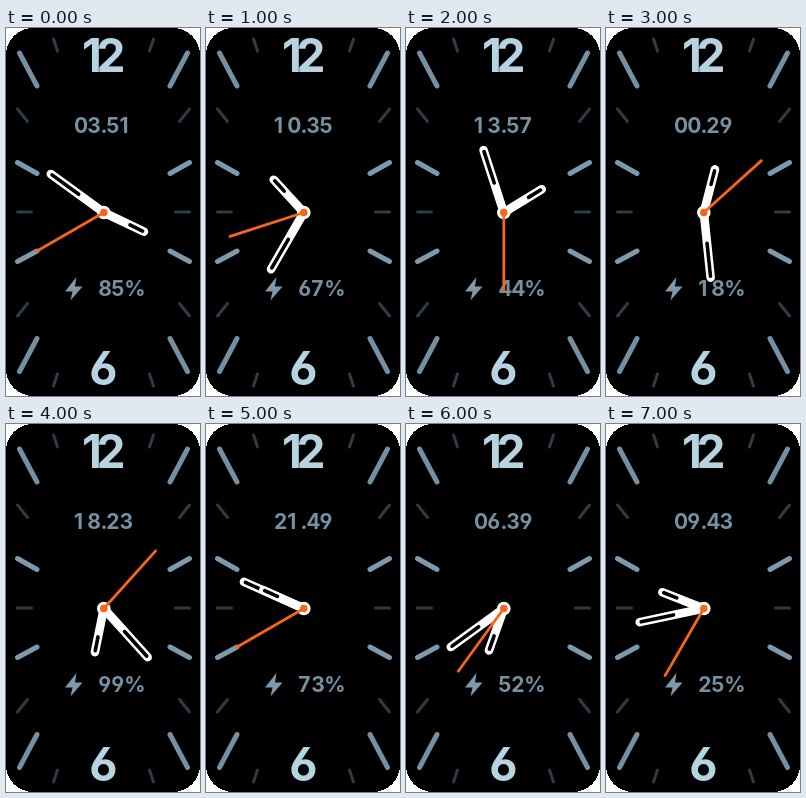
An HTML page for the animation above (8 s loop, 194 px wide and 368 px high).

```html
<!DOCTYPE html>
<html lang="en">
<head>
<meta charset="utf-8">
<title>Watch face</title>
<style>
  html, body { margin: 0; width: 100%; height: 100%; overflow: hidden; background: #fff; }
  svg { display: block; width: 194px; height: 368px; }
  text { font-family: Inter, "Open Sans", sans-serif; font-feature-settings: "cv03", "cv04"; }
  .big { font-size: 46px; font-weight: 650; fill: #b5d3e0; }
  .info { font-size: 21px; font-weight: 650; fill: #7391a3; }
  .tick { fill: none; stroke-linecap: round; }
  .long { stroke: #7391a3; stroke-width: 5; }
  .mid { stroke: #7c9aab; stroke-width: 5; }
  .dim { stroke: #2b3d47; stroke-width: 3; }
  .hand { fill: none; stroke-linecap: round; }
  .body { stroke: #fff; stroke-width: 8.6; }
  .slot { stroke: #000; stroke-width: 3.6; }
  .second { stroke: #f8651a; stroke-width: 2.8; }
</style>
</head>
<body>
<svg viewBox="0 0 194 368">
  <defs>
    <g id="side" class="tick">
      <path class="long" d="M13.500 25L31 58M31 310.500L13.500 343.500"/>
      <path class="mid" d="M11.500 134.500L31 145.500M11.500 233.500L31 223"/>
      <path class="dim" d="M11.500 81L21.500 93.500M11.500 184H25.500M11.500 288L21.500 275.500M47.500 11L51.500 23M51.500 346L47.500 358"/>
    </g>
  </defs>
  <rect width="194" height="368" rx="27" shape-rendering="crispEdges"/>
  <use href="#side"/>
  <use href="#side" transform="matrix(-1 0 0 1 195 0)"/>
  <text class="big" x="76 90.500" y="43.500">12</text>
  <text class="big" x="97.300" y="357" text-anchor="middle">6</text>
  <text class="info" id="time" x="68 81.200 94.600 100.200 113.500" y="104.500"></text>
  <path fill="#7c9aab" d="M70.500 249L59 263.500H66.500L64.500 272.500L76.500 258.500H69Z"/>
  <text class="info" id="power" x="92.300 105.300 118.300" y="267.500"></text>
  <g transform="translate(97.800 184.500)">
    <g id="minute" class="hand">
      <path class="body" d="M0 0V-65.500"/>
      <path class="slot" d="M0 -31V-64"/>
    </g>
    <g id="hour" class="hand">
      <path class="body" d="M0 0V-44.500"/>
      <path class="slot" d="M0 -29V-43"/>
    </g>
    <circle r="6.800" fill="#fff"/>
    <path id="second" class="hand second" d="M0 0V-77.500"/>
    <circle r="3.800" fill="#f8651a"/>
  </g>
</svg>
<script>
  // hour, minute, second, battery level
  const states = [
    [3, 51, 40, 85],
    [10, 35, 42, 67],
    [13, 57, 30, 44],
    [0, 29, 8, 18],
    [18, 23, 7, 99],
    [21, 49, 40, 73],
    [6, 39, 36, 52],
    [9, 43, 35, 25]
  ];
  const get = id => document.getElementById(id);
  const pad = n => String(n).padStart(2, '0');
  const turn = (id, angle) => get(id).setAttribute('transform', `rotate(${angle})`);
  let shown = -1;

  function show([h, m, s, level]) {
    get('time').textContent = `${pad(h)}.${pad(m)}`;
    get('power').textContent = `${level}%`;
    turn('hour', h % 12 * 30 + m / 2);
    turn('minute', m * 6);
    turn('second', s * 6);
  }

  function tick() {
    const i = Math.floor(performance.now() / 1000) % states.length;
    if (i !== shown) show(states[shown = i]);
    requestAnimationFrame(tick);
  }
  tick();
</script>
</body>
</html>
```
